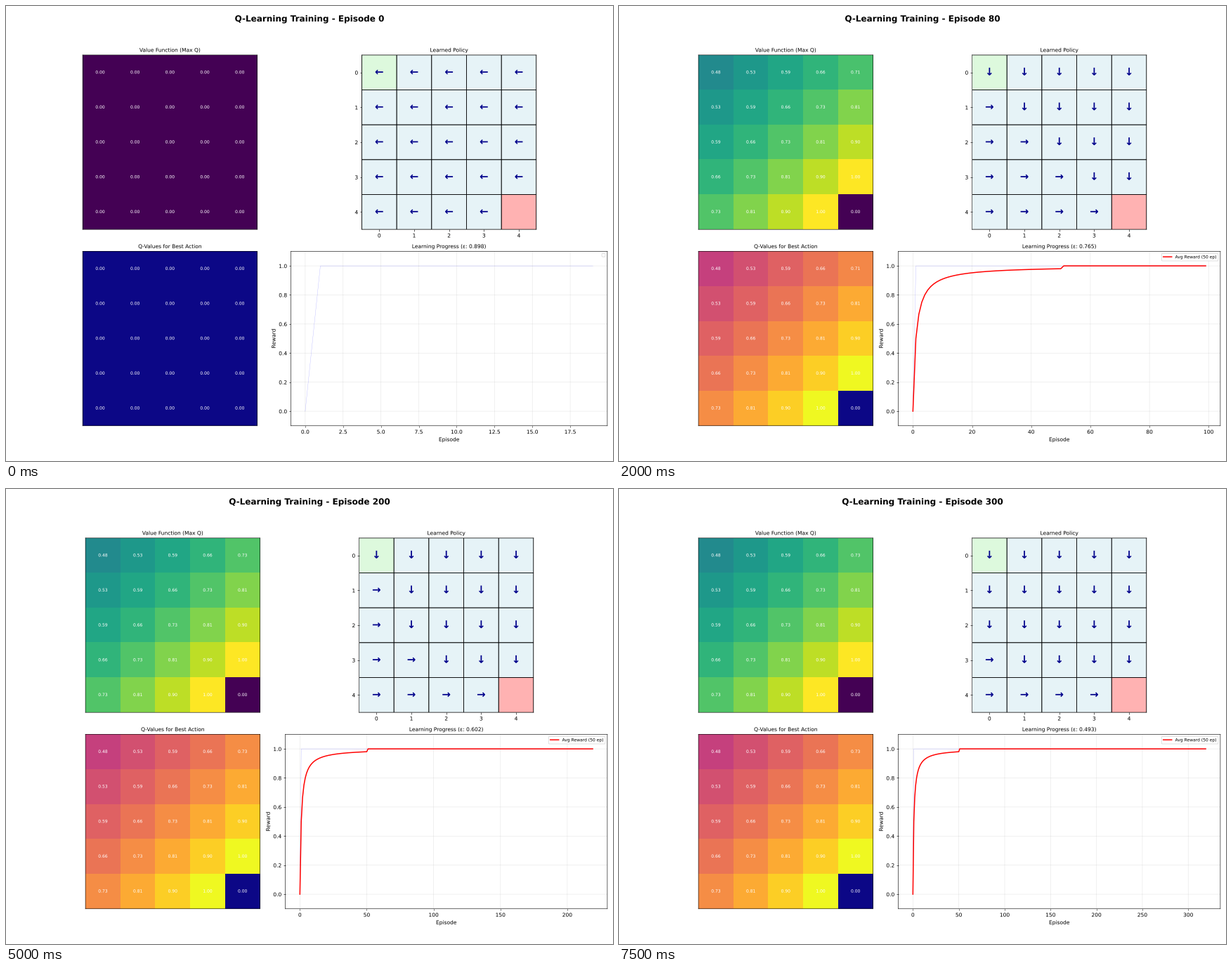
Write a matplotlib script that moves like this. It is 864 px wide and 648 px high and loops after 8 s.

```python
import numpy as np
import matplotlib.pyplot as plt
from matplotlib.animation import FuncAnimation
from matplotlib.patches import Rectangle
from matplotlib.patheffects import Normal

# Soft, unsnapped lines and text at fractional pixel positions
plt.rcParams.update({"path.snap": False, "text.hinting": "none",
                     "path.effects": [Normal()]})

W, H, DPI = 864, 648, 54
N = 5               # grid size
STEP = 20           # episodes per update
FRAMES = 16
GAMMA = 0.9
WINDOW = 50
MARGIN = 8.1
ROW_TOPS = (69.8, 349.4)
ROW_HEIGHT = 248.4

fig = plt.figure(figsize=(W / DPI, H / DPI), dpi=DPI, facecolor="white")
ax_value, ax_policy, ax_best, ax_reward = (fig.add_axes([0, 0, 1, 1], label=k)
                                           for k in ("v", "p", "b", "r"))


def values(step):
    """Optimal state values minus a lag that fades as training goes on."""
    if step == 0:
        return np.zeros((N, N))
    row, col = np.indices((N, N))
    dist = 2 * (N - 1) - row - col
    fast = 0.02 ** (step - 1)
    slow = 0.32 * np.exp(-0.19 * step ** 2)
    side = np.abs(col - row) / (N - 1)
    lag = 0.08 * fast * np.clip((dist - 2) / 4, 0, 1)
    lag += np.where(col > row, slow * side ** (4 * step), 0.15 * fast * side ** 4)
    return np.where(dist > 0, GAMMA ** (dist - 1.0) - lag, 0)


def arrow(step, row, col):
    if step == 0:
        return "←"
    # The border between "right" and "down" drifts towards the lower left
    border = round(0.83 * row + 0.1 - 0.0107 * (step - 4) ** 2)
    return "→" if row == N - 1 or col < border else "↓"


def place(left, right):
    """Lay out both columns; left and right are the reward chart's edges."""
    width = right - left
    columns = (MARGIN, left)
    for i, ax in enumerate((ax_value, ax_policy, ax_best, ax_reward)):
        y = H - ROW_TOPS[i // 2] - ROW_HEIGHT
        ax.set_position([columns[i % 2] / W, y / H, width / W, ROW_HEIGHT / H])


def fit_layout(step):
    left, right = 397.5 + 7.9 * 0.22 ** step, W - MARGIN
    place(left, right)
    # Make room for a last tick label that sticks out on the right
    overflow = ax_reward.get_tightbbox().x1 - right
    if overflow > 1:
        place(left - overflow / 2, right - overflow)


def draw_heatmap(ax, v, cmap, title):
    ax.imshow(v, cmap=cmap)
    for (row, col), q in np.ndenumerate(v):
        ax.text(col, row, f"{q:.2f}", ha="center", va="center",
                color="white", fontsize=8)
    ax.set_xticks([])
    ax.set_yticks([])
    ax.set_title(title, fontsize=10)


def draw_policy(ax, step):
    goal = (N - 1, N - 1)
    for row, col in np.ndindex(N, N):
        color = {(0, 0): "lightgreen", goal: "red"}.get((row, col), "lightblue")
        ax.add_patch(Rectangle((col - 0.5, row - 0.5), 1, 1, lw=1,
                               facecolor=(color, 0.3), edgecolor="black"))
        if (row, col) != goal:
            ax.text(col, row, arrow(step, row, col), ha="center", va="center",
                    fontsize=20, fontweight="bold", color="darkblue")
    ax.set(xlim=(-0.5, N - 0.5), ylim=(N - 0.5, -0.5), aspect="equal",
           xticks=range(N), yticks=range(N))
    ax.set_title("Learned Policy", fontsize=10)


def draw_rewards(ax, episode):
    x = np.arange(episode + STEP)
    rewards = (x > 0).astype(float)
    ax.plot(x, rewards, color="blue", alpha=0.3, lw=0.5)
    if len(x) > WINDOW:
        avg = [rewards[max(0, i - WINDOW):i + 1].mean() for i in x]
        line, = ax.plot(x, avg, color="red", lw=2)
        ax.legend([line], ["Avg Reward (50 ep)"], fontsize=8, loc="upper right")
    else:
        ax.legend([], [], fontsize=8, loc="upper right")
    epsilon = 0.9 * 0.998 ** (episode + 1)
    ax.set_title(f"Learning Progress (ε: {epsilon:.3f})", fontsize=10)
    ax.set(xlabel="Episode", ylabel="Reward", ylim=(-0.1, 1.1))
    ax.grid(True, alpha=0.3)


def update(step):
    for ax in fig.axes:
        ax.clear()
    episode = step * STEP
    v = values(step)
    draw_heatmap(ax_value, v, "viridis", "Value Function (Max Q)")
    draw_policy(ax_policy, step)
    draw_heatmap(ax_best, v, "plasma", "Q-Values for Best Action")
    draw_rewards(ax_reward, episode)
    fig.suptitle(f"Q-Learning Training - Episode {episode}",
                 fontsize=16, fontweight="bold")
    fit_layout(step)
    return fig.axes


anim = FuncAnimation(fig, update, frames=FRAMES, interval=500, repeat=True,
                     repeat_delay=0, init_func=lambda: update(0))
plt.show()
```
